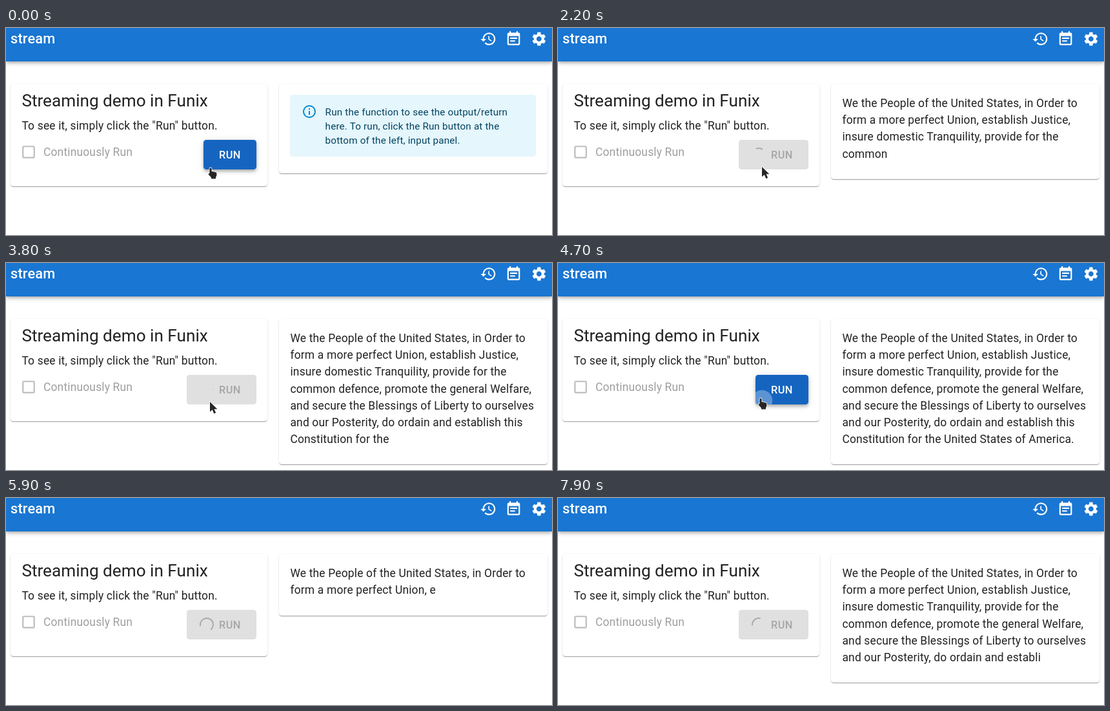
Animation of 846x322 px, one loop 8000 ms. Source, as an HTML page:

```html
<!DOCTYPE html>
<html lang="en">
<head>
<meta charset="utf-8">
<title>stream</title>
<style>
  html, body { margin: 0; width: 100%; height: 100%; overflow: hidden; background: #fff; }
  body { position: relative; font: 400 17.44px/26.16px Roboto, sans-serif; letter-spacing: .1636px; color: rgba(0,0,0,.87); }
  body > * { position: absolute; }
  header { left: 0; top: 0; width: 846px; height: 52px; background: #1976d2;
    box-shadow: 0 2.18px 4.36px -1.09px rgba(0,0,0,.2), 0 4.36px 5.45px rgba(0,0,0,.14), 0 1.09px 10.9px rgba(0,0,0,.12); }
  .card { top: 86.7px; background: #fff; border-radius: 4.36px;
    box-shadow: 0 2.18px 1.09px -1.09px rgba(0,0,0,.2), 0 1.09px 1.09px rgba(0,0,0,.14), 0 1.09px 3.27px rgba(0,0,0,.12); }
  #form { left: 7px; width: 398px; height: 159.3px; }
  #panel { left: 423px; width: 416px; }
  #out { position: absolute; left: 17.44px; top: 17.44px; width: 381.1px; }
  #info { position: absolute; left: 17.44px; top: 17.44px; width: 381px; height: 95.9px; border-radius: 4.36px; background: #e5f6fd; }
  #run { top: 174px; height: 46px; border-radius: 4.36px; overflow: hidden; }
  #ripple { position: absolute; left: -80px; top: -50px; width: 180px; height: 180px; border-radius: 50%; background: #fff; }
  svg { left: 0; top: 0; width: 846px; height: 322px; overflow: hidden; }
  #stage text { white-space: pre; }
</style>
</head>
<body>
<header></header>
<div class="card" id="form"></div>
<div class="card" id="panel"><div id="info"></div><div id="out"></div></div>
<div id="run"><div id="ripple"></div></div>
<svg id="stage" viewBox="0 0 846 322" fill="rgba(0,0,0,.87)">
  <g fill="#fff">
    <text x="7" y="24" font-size="21.8" font-weight="500">stream</text>
    <path transform="translate(734.3 3.9) scale(1.09)" d="M13 3c-4.97 0-9 4.03-9 9H1l3.89 3.89.07.14L9 12H6c0-3.87 3.13-7 7-7s7 3.13 7 7-3.13 7-7 7c-1.93 0-3.68-.79-4.94-2.06l-1.42 1.42C8.27 19.99 10.51 21 13 21c4.97 0 9-4.03 9-9s-4.03-9-9-9zm-1 5v5l4.28 2.54.72-1.21-3.5-2.08V8H12z"/>
    <path transform="translate(773.5 3.9) scale(1.09)" d="M17 10H7v2h10v-2zm2-7h-1V1h-2v2H8V1H6v2H5c-1.11 0-1.99.9-1.99 2L3 19c0 1.1.89 2 2 2h14c1.1 0 2-.9 2-2V5c0-1.1-.9-2-2-2zm0 16H5V8h14v11zm-5-5H7v2h7v-2z"/>
    <path transform="translate(812.8 3.9) scale(1.09)" d="M19.14 12.94c.04-.3.06-.61.06-.94 0-.32-.02-.64-.07-.94l2.03-1.58c.18-.14.23-.41.12-.61l-1.92-3.32c-.12-.22-.37-.29-.59-.22l-2.39.96c-.5-.38-1.03-.7-1.62-.94l-.36-2.54c-.04-.24-.24-.41-.48-.41h-3.84c-.24 0-.43.17-.47.41l-.36 2.54c-.59.24-1.13.57-1.62.94l-2.39-.96c-.22-.08-.47 0-.59.22L2.74 8.87c-.12.21-.08.47.12.61l2.03 1.58c-.05.3-.09.63-.09.94s.02.64.07.94l-2.03 1.58c-.18.14-.23.41-.12.61l1.92 3.32c.12.22.37.29.59.22l2.39-.96c.5.38 1.03.7 1.62.94l.36 2.54c.05.24.24.41.48.41h3.84c.24 0 .44-.17.47-.41l.36-2.54c.59-.24 1.13-.56 1.62-.94l2.39.96c.22.08.47 0 .59-.22l1.92-3.32c.12-.22.07-.47-.12-.61l-2.01-1.58zM12 15.6c-1.98 0-3.6-1.62-3.6-3.6s1.62-3.6 3.6-3.6 3.6 1.62 3.6 3.6-1.62 3.6-3.6 3.6z"/>
  </g>
  <text x="24.4" y="122.3" font-size="26.16" letter-spacing="0">Streaming demo in Funix</text>
  <text x="24.4" y="158">To see it, simply click the "Run" button.</text>
  <path transform="translate(21.9 179.9) scale(1.09)" fill="rgba(0,0,0,.26)" d="M19 5v14H5V5h14m0-2H5c-1.1 0-2 .9-2 2v14c0 1.1.9 2 2 2h14c1.1 0 2-.9 2-2V5c0-1.1-.9-2-2-2z"/>
  <text x="58" y="199" fill="rgba(0,0,0,.38)">Continuously Run</text>
  <g id="hint" fill="#014361" font-size="15.26">
    <path transform="translate(458 118) scale(1)" fill="#0288d1" d="M11 9h2V7h-2zM12 20C7.59 20 4 16.41 4 12S7.59 4 12 4s8 3.59 8 8-3.59 8-8 8M12 2A10 10 0 0 0 2 12a10 10 0 0 0 10 10 10 10 0 0 0 10-10A10 10 0 0 0 12 2M11 17h2v-6h-2z"/>
    <text x="494.6" y="136">Run the function to see the output/return</text>
    <text x="494.6" y="158">here. To run, click the Run button at the</text>
    <text x="494.6" y="180">bottom of the left, input panel.</text>
  </g>
  <text id="label" x="330" y="203" font-size="16.35" font-weight="500" letter-spacing=".467">RUN</text>
  <circle id="spin" r="20.2" fill="none" stroke="#a6a6a6" stroke-width="3.6"/>
  <g stroke="#fff" stroke-width="1.6" stroke-linejoin="round" fill="#262626" paint-order="stroke">
    <path id="arrow" d="M0 0V15.5L3.7 12.2 6.3 18.2 9.2 17 6.6 11.2H11.4Z"/>
    <path id="hand" d="M-.6 1.8Q-.6.4 .9.4T2.6 1.8V6.4Q4.2 5.4 5.2 6.7 6.8 6 7.7 7.3 9.9 6.8 10.4 8.8V12.6L9 15.3V17.6H2V15.6L-2 11.3Q-2.9 9.6-1.6 9L-.6 9.6Z"/>
  </g>
</svg>
<script>
const LOOP = 8000, STEP = 100;
const TEXT = 'We the People of the United States, in Order to form a more perfect Union, ' +
  'establish Justice, insure domestic Tranquility, provide for the common defence, ' +
  'promote the general Welfare, and secure the Blessings of Liberty to ourselves ' +
  'and our Posterity, do ordain and establish this Constitution for the United States of America.';

// [ms, characters typed]
const TYPED = [[0, 0], [703, 0], [1000, 29.4], [2200, 145.5], [3800, 301.5], [4062, 327],
  [5109, 327], [5110, 0], [5400, 28], [6600, 144.5], [7900, 273.5], [8000, 283]];
const CLICKS = [300, 4700];
// fade: colours begin to change; wide: spinner layout shown
const BUSY = [
  { fade: 970, wide: 1010, spin: 1008, end: 4080 },
  { fade: 5370, wide: 5410, spin: 5388, end: 9000 }
];
// [ms, shape, x, y]
const POINTER = [[0, 'hand', 316, 217], [1000, 'arrow', 316, 216], [4200, 'hand', 313, 210],
  [5400, 'arrow', 313, 209], [5700, 'arrow', 306, 238], [5800, 'arrow', 300, 273], [5900, '', 0, 0]];

const el = id => document.getElementById(id);
const clamp = v => Math.max(0, Math.min(1, v));
const mix = (a, b, p) => a + (b - a) * p;
const rgb = (a, b, p) => `rgb(${a.map((v, i) => Math.round(mix(v, b[i], p)))})`;

function bezier(x1, y1, x2, y2) {
  const at = (a, b, u) => 3 * a * u * (1 - u) ** 2 + 3 * b * u * u * (1 - u) + u ** 3;
  return x => {
    let lo = 0, hi = 1;
    for (let i = 0; i < 24; i++) {
      const mid = (lo + hi) / 2;
      if (at(x1, x2, mid) < x) lo = mid; else hi = mid;
    }
    return at(y1, y2, lo);
  };
}
const easeStd = bezier(.4, 0, .2, 1), easeInOut = bezier(.42, 0, .58, 1);

function typed(t) {
  const i = TYPED.findIndex(p => p[0] > t);
  const [a, b] = [TYPED[i - 1], TYPED[i]];
  return Math.floor(mix(a[1], b[1], (t - a[0]) / (b[0] - a[0])));
}

function drawPanel(t) {
  const idle = t < 703;
  el('info').style.display = el('hint').style.display = idle ? '' : 'none';
  el('out').textContent = TEXT.slice(0, typed(t));
  const body = idle ? 95.9 : Math.max(26.16, el('out').getBoundingClientRect().height);
  el('panel').style.height = body + 43.6 + 'px';
}

function drawButton(t) {
  const run = BUSY.find(b => t >= b.fade && t < b.end + 250);
  const p = run ? easeStd(clamp((t - run.fade) / 250)) * (1 - easeStd(clamp((t - run.end) / 250))) : 0;
  const wide = run && t >= run.wide && t < run.end;
  const s = el('run').style, a = 1 - p;
  s.left = (wide ? 280 : 306) + 'px';
  s.width = (wide ? 108 : 82) + 'px';
  s.background = rgb([21, 101, 192], [224, 224, 224], p);
  s.boxShadow = `0 2.18px 4.36px -1.09px rgba(0,0,0,${.2 * a}), 0 4.36px 5.45px rgba(0,0,0,${.14 * a}), 0 1.09px 10.9px rgba(0,0,0,${.12 * a})`;
  el('label').setAttribute('fill', rgb([255, 255, 255], [166, 166, 166], p));
  el('spin').style.display = wide ? '' : 'none';
  if (wide) drawSpinner((t - run.spin) / 1400 % 1);
  drawRipple(t);
}

function drawRipple(t) {
  const start = CLICKS.find(c => t >= c && t < c + 750);
  const r = el('ripple').style;
  r.display = start === undefined ? 'none' : '';
  if (start === undefined) return;
  const d = t - start;
  r.transform = `scale(${mix(.15, 1.1, easeStd(clamp((d + 60) / 550)))})`;
  r.opacity = .3 * (1 - easeStd(clamp((d - 200) / 550)));
}

function drawSpinner(p) {
  const e = easeInOut(p < .5 ? p * 2 : p * 2 - 1);
  const len = p < .5 ? mix(1, 100, e) : 100;
  const off = p < .5 ? mix(0, -15, e) : mix(-15, -125, e);
  const c = el('spin');
  c.setAttribute('transform', `translate(311 197) rotate(${p * 360}) scale(.495)`);
  c.setAttribute('stroke-dasharray', `${len} 200`);
  c.setAttribute('stroke-dashoffset', off);
}

function drawPointer(t) {
  const [, shape, x, y] = POINTER.filter(p => p[0] <= t).pop();
  for (const id of ['arrow', 'hand']) {
    el(id).style.display = id === shape ? '' : 'none';
    el(id).setAttribute('transform', `translate(${x} ${y})`);
  }
}

function render(now) {
  const t = Math.floor(now % LOOP / STEP) * STEP;
  drawPanel(t);
  drawButton(t);
  drawPointer(t);
}

const t0 = performance.now();
function tick() {
  render(performance.now() - t0);
  requestAnimationFrame(tick);
}
tick();
</script>
</body>
</html>
```
